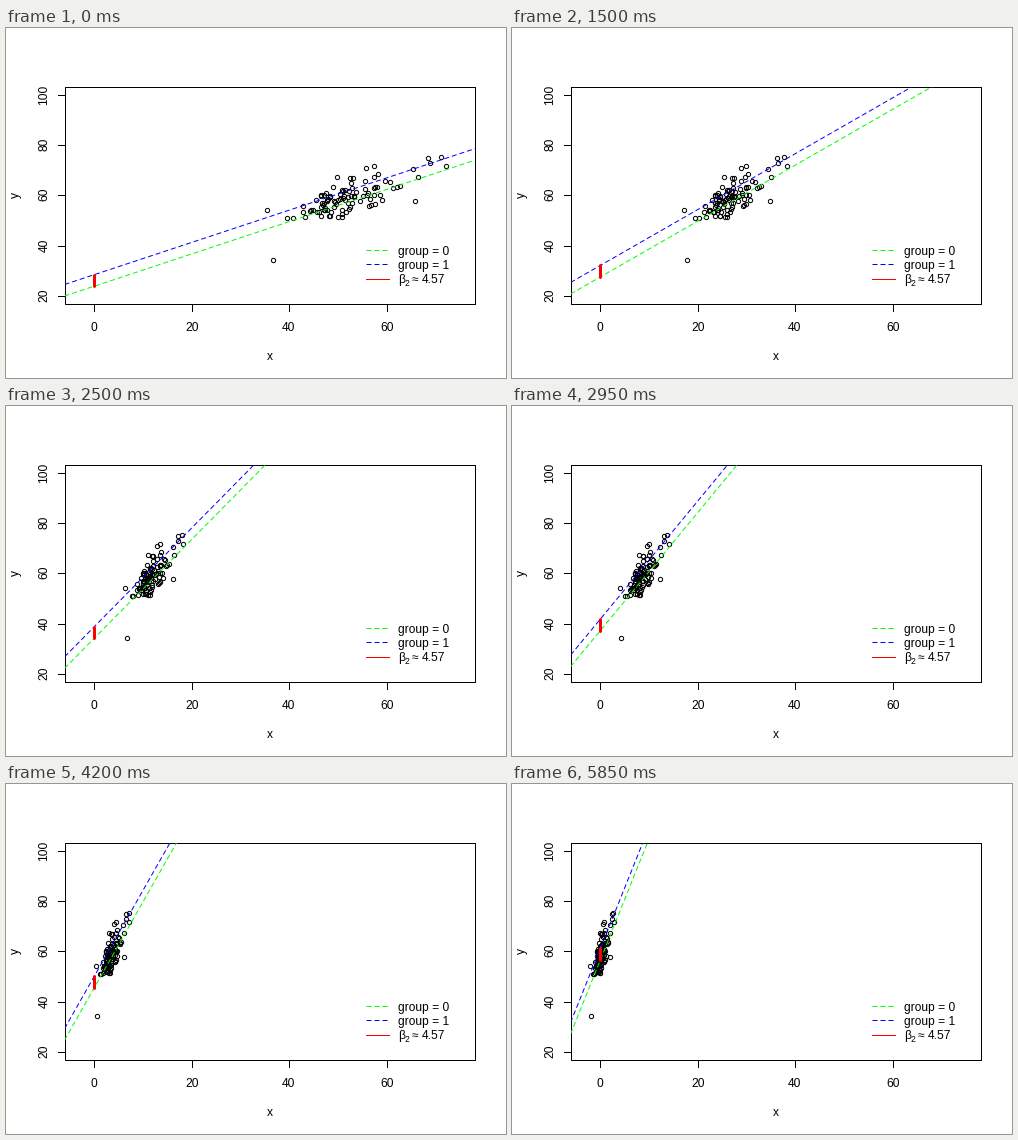
A matplotlib script that plays this animation: 500 by 350 pixels, repeating every 6850 ms.

```python
import numpy as np
import matplotlib.pyplot as plt
from matplotlib.animation import FuncAnimation

W, H = 500, 350
LEFT, RIGHT, TOP, BOTTOM = 58.54, 469.26, 58.54, 276.06
X_RANGE, Y_RANGE = (-6.12, 78.12), (16.8, 103.2)
GREEN, BLUE, RED = "#00ff00", "#0000ff", "#ff0000"
DASH = (0, (5, 3))

STEP_MS, HOLD, STEPS = 50, 20, 98
FRAMES = 2 * HOLD + STEPS - 1

COUNT = 100
MEAN, SD = 51.0, 7.52
INTERCEPT, SLOPE, EFFECT = 23.92, 0.641, 4.57

plt.rcParams["font.family"] = "Liberation Sans"
plt.rcParams["font.size"] = 12


def make_data():
    """A random cloud around the two fits, plus its few outlying points."""
    outliers = np.array([
        (35.4, 54.2), (36.6, 34.3), (39.5, 51.0), (40.7, 51.0),
        (49.8, 67.3), (55.7, 70.8), (57.3, 71.6), (65.8, 57.7),
        (66.4, 67.3), (65.3, 70.4), (68.4, 74.8), (68.8, 72.8),
        (71.1, 75.2), (72.1, 71.6),
    ])
    rng = np.random.default_rng(7)
    n = COUNT - len(outliers)
    x = rng.triangular(42, 48, 64, n)
    spread = np.interp(x, [42, 50, 64], [3.0, 4.2, 3.0])
    noise = np.clip(rng.normal(0, 1, n), -1.8, 1.8) * spread
    y = INTERCEPT + EFFECT / 2 + SLOPE * x + noise
    return np.append(x, outliers[:, 0]), np.append(y, outliers[:, 1])


data_x, data_y = make_data()

fig = plt.figure(figsize=(W / 72, H / 72), dpi=72, facecolor="white")
page = fig.add_axes([0, 0, 1, 1])
page.set(xlim=(0, W), ylim=(H, 0))
page.axis("off")
plot = fig.add_axes([LEFT / W, 1 - BOTTOM / H,
                     (RIGHT - LEFT) / W, (BOTTOM - TOP) / H])
plot.set(xlim=X_RANGE, ylim=Y_RANGE)
plot.axis("off")


def to_px(x):
    return round(np.interp(x, X_RANGE, (LEFT, RIGHT)))


def to_py(y):
    return round(np.interp(y, Y_RANGE, (BOTTOM, TOP)))


def stroke(xs, ys, color="black", style="-"):
    page.plot(xs, ys, color=color, lw=1, ls=style, snap=True,
              solid_capstyle="projecting", dash_capstyle="butt")


def label(x, y, text, **kwargs):
    page.text(x, y, text, va="baseline", rotation_mode="anchor", **kwargs)


def draw_frame():
    left, right, top, bottom = (round(v) for v in (LEFT, RIGHT, TOP, BOTTOM))
    stroke([left, right, right, left, left], [top, top, bottom, bottom, top])
    for value in range(0, 61, 20):
        x = to_px(value)
        stroke([x, x], [bottom, bottom + 7])
        label(x - 0.3, 303, str(value), ha="center")
    for value in range(20, 101, 20):
        y = to_py(value)
        stroke([left, left - 7], [y, y])
        label(41.5, y - 0.3, str(value), ha="center", rotation=90)
    label(263.5, 332, "x", ha="center")
    label(13, 167.5, "y", ha="center", rotation=90)


def draw_legend():
    rows = [(222, GREEN, DASH), (236, BLUE, DASH), (251, RED, "-")]
    for y, color, style in rows:
        stroke([360, 383], [y, y], color, style)
    label(392, 227, "group = 0")
    label(392, 241, "group = 1")
    label(392, 255, "β")
    label(399, 258, "2", fontsize=8.5)
    label(406, 255, "≈")
    label(416, 255, "4.57")


draw_frame()
draw_legend()

points, = plot.plot([], [], "o", ms=4.3, mfc="none", mec="black", mew=1,
                    clip_on=False)
fits = [plot.plot([], [], color=color, lw=1, ls=DASH, dash_capstyle="butt")[0]
        for color in (GREEN, BLUE)]
gap, = plot.plot([], [], color=RED, lw=3, solid_capstyle="round")


def update(frame):
    t = np.clip(frame - HOLD + 1, 0, STEPS) / STEPS
    shift = MEAN * t
    scale = 1 + (SD - 1) * t
    points.set_data((data_x - shift) / scale, data_y)

    base = INTERCEPT + SLOPE * shift
    slope = SLOPE * scale
    for line, start in zip(fits, (base, base + EFFECT)):
        end = min(X_RANGE[1], (Y_RANGE[1] - start) / slope)
        xs = np.array([X_RANGE[0], end])
        line.set_data(xs, start + slope * xs)
    gap.set_data([0, 0], [base, base + EFFECT])
    return [points, *fits, gap]


anim = FuncAnimation(fig, update, frames=FRAMES, interval=STEP_MS,
                     repeat=True, repeat_delay=0, blit=False)
plt.show()
```
